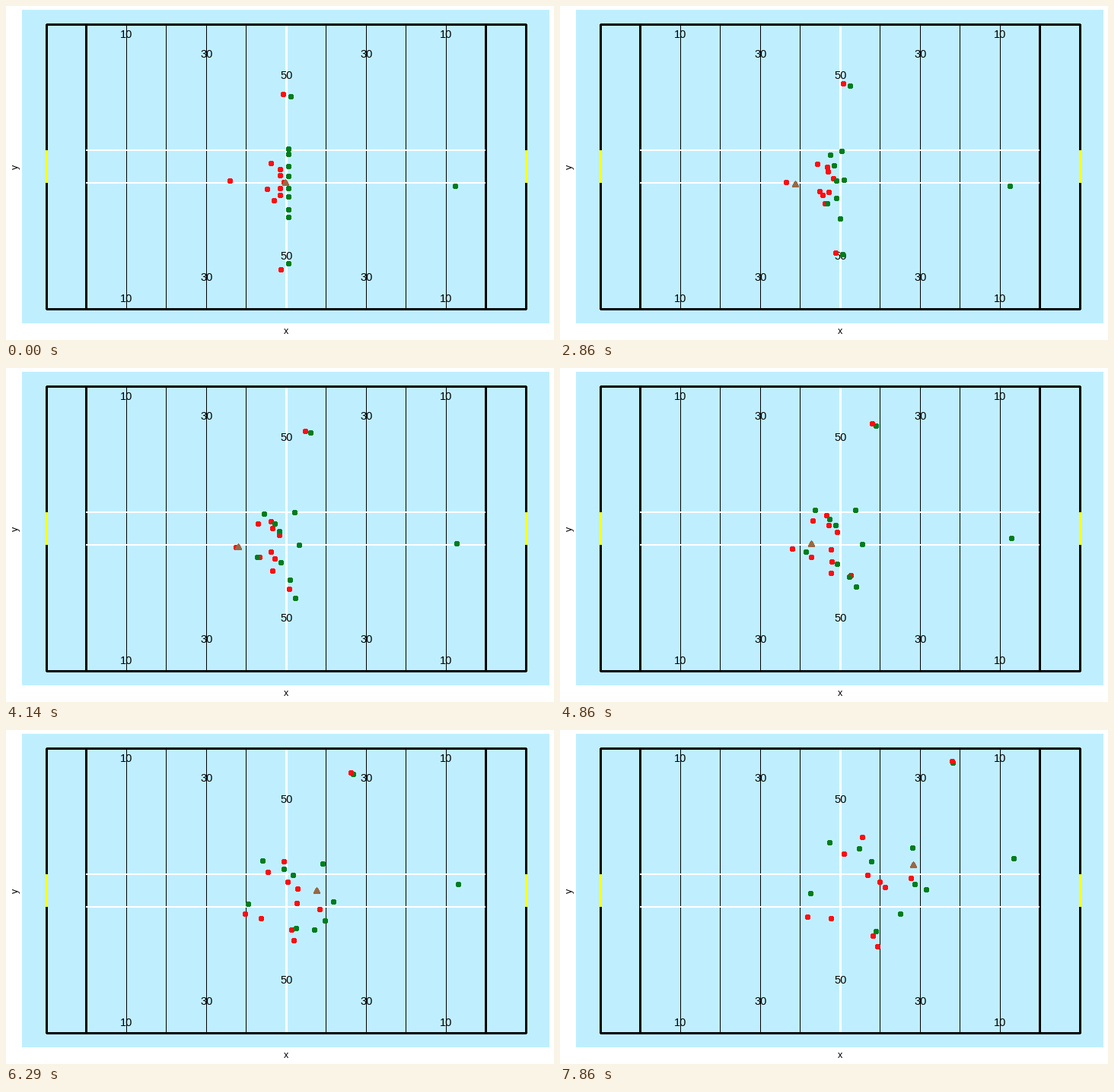
Animation of 720 by 440 pixels, one loop 8000 ms. Source, as a matplotlib script:

```python
import matplotlib.pyplot as plt
import numpy as np
from matplotlib.animation import FuncAnimation
from matplotlib.patches import Polygon, Rectangle

W, H, DPI = 720, 440, 100
LOOP, TICK, STEPS = 8000, 40, 56
SNAP = 14  # step at which the play starts
PX = 72 / DPI  # points per pixel

SKY, RED, GREEN, BROWN = "#BFEFFF", "#FF0D12", "#007D1E", "#9A6845"
FRONT, RUSH = 360, 371  # x of the two facing lines

# Each player accelerates evenly from a start to a finish (x0, y0, x1, y1).
# Groups: colour, acceleration, players; later groups lie on top.
SQUADS = [
    (RED, (112, 60), [  # held up by a block
        (348, 207, 373, 163), (FRONT, 215, 397, 141), (343, 241, 427, 207)]),
    (RED, (112, 0), [  # free runners
        (FRONT, 223, 404, 191), (365, 232, 420, 200), (FRONT, 240, 411, 271),
        (FRONT, 249, 356, 248), (352, 256, 417, 285), (361, 347, 461, 195)]),
    (RED, (16, 0), [(294, 230, 325, 246)]),  # punter
    (GREEN, (112, 60), [
        (RUSH, 188, 463, 155), (RUSH, 195, 354, 148), (RUSH, 211, 393, 156),
        (RUSH, 224, 481, 210), (RUSH, 278, 447, 242), (RUSH, 339, 466, 203)]),
    (GREEN, (112, 0), [
        (RUSH, 240, 409, 173), (RUSH, 251, 415, 265), (RUSH, 268, 329, 215)]),
    (GREEN, (0, 80), [(590, 237, 596, 169)]),  # returner
    (GREEN, (112, -25), [(374, 119, 516, 43)]),  # wide pair
    (RED, (112, -25), [(364, 116, 515, 41)]),
]

# Snap, catch, kick and flight: (step, x, y).
BALL = [(13, 367, 232), (20, 309, 234), (22, 301, 235), (31, 306, 235),
        (38, 361, 225), (44, 408, 211), (55, 464, 177)]


def player_paths():
    """Positions for every step, shape (STEPS, players, 2), and colours."""
    u = np.clip((np.arange(STEPS) - SNAP) / (STEPS - 1 - SNAP), 0, 1)
    u = u[:, None]
    paths, colors = [], []
    for color, accel, rows in SQUADS:
        for x0, y0, x1, y1 in rows:
            start, end = np.array([x0, y0]), np.array([x1, y1])
            bend = np.array(accel) * np.array([-1, 1])
            paths.append(start + (end - start) * u + bend * u * (1 - u))
            colors.append(color)
    return np.rint(np.stack(paths, axis=1)), colors


def ball_path():
    t, x, y = np.transpose(BALL)
    s = np.arange(STEPS)
    return np.rint(np.column_stack([np.interp(s, t, x), np.interp(s, t, y)]))


fig = plt.figure(figsize=(W / DPI, H / DPI), dpi=DPI, facecolor="white")
ax = fig.add_axes([0, 0, 1, 1])
ax.set(xlim=(0, W), ylim=(H, 0))
ax.axis("off")


def box(x0, y0, x1, y1, color, z=1):
    ax.add_patch(Rectangle((x0, y0), x1 - x0, y1 - y0, fc=color, lw=0,
                           antialiased=False, zorder=z))


def label(x, y, text, size, **kw):
    ax.text(x + 0.5, y + 0.5, text, fontsize=size * PX, ha="center",
            va="center", family="Liberation Sans", color="black", zorder=3,
            **kw)


def draw_field():
    box(21, 5, 714, 418, SKY)
    for k in range(1, 10):
        x = int(105.5 + 52.5 * k)
        if k == 5:
            box(367, 24, 370, 399, "white")
        else:
            box(x, 24, x + 1, 399, "black")
    for x in (53, 105, 630, 683):
        box(x - 1, 24, x + 2, 400, "black")
    for y in (24, 399):
        box(53, y - 1, 684, y + 2, "black")
    for y in (190, 233):
        box(105, y - 1, 630, y + 1, "white", 2)
    for x in (52, 682):
        box(x, 190, x + 3, 233, "yellow", 2)
    for num, xs, ys in (("10", (158, 578), (38, 386)),
                        ("30", (263, 473), (63, 358)),
                        ("50", (368,), (91, 330))):
        for x in xs:
            for y in ys:
                label(x, y, num, 14.67)
    label(367.5, 429, "x", 12.5)
    label(12, 211, "y", 12.5, rotation=90)


draw_field()
(players, colors), ball = player_paths(), ball_path()
dots = ax.scatter(*players[0].T, s=(7 * PX) ** 2, c=colors, linewidths=0,
                  antialiased=False, zorder=4)
TRIANGLE = np.array([(-4.5, 4), (4.5, 4), (0, -4.5)])
marker = ax.add_patch(Polygon(TRIANGLE, fc=BROWN, lw=0, antialiased=False,
                              zorder=5))


def update(i):
    s = min(int((i + 1) * TICK * STEPS / LOOP), STEPS - 1)
    dots.set_offsets(players[s] + 0.5)
    marker.set_xy(TRIANGLE + ball[s] + 0.5)
    return dots, marker


anim = FuncAnimation(fig, update, frames=LOOP // TICK, interval=TICK,
                     repeat=True, repeat_delay=0)
plt.show()
```
